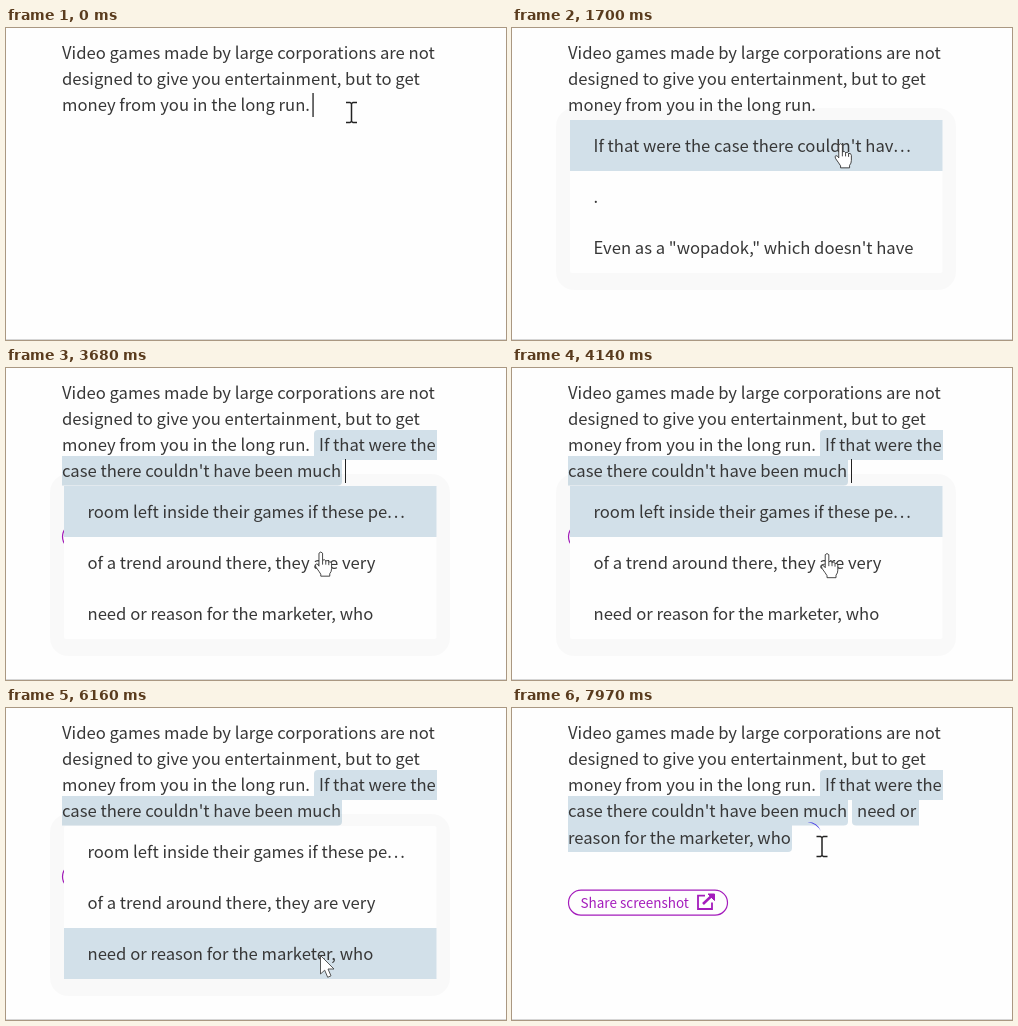
An HTML page that plays this animation: 500x312 px, repeating every 8 s.

```html
<!DOCTYPE html>
<html lang="en">
<head>
<meta charset="utf-8">
<title>Writing suggestions</title>
<style>
html, body { margin: 0; width: 100%; height: 100%; overflow: hidden; background: #fefefe; }
svg { display: block; width: 500px; height: 312px; }
text { font: 16.65px "Noto Sans CJK JP", "Noto Sans CJK SC", "Noto Sans", sans-serif; fill: #373737; white-space: pre; }
.dots { letter-spacing: 1.8px; }
.mark { fill: #d2e0e9; }
.share text { font-size: 13.5px; fill: #a41cbc; }
.share path, .share rect { fill: none; stroke: #a41cbc; }
.halo { fill: #000; fill-opacity: .018; }
.panel { fill: #fefefe; }
#spin { fill: #4a42e6; }
</style>
</head>
<body>
<svg viewBox="0 0 500 312">
  <rect y="311" width="500" height="1" fill="#d6d6d6"/>
  <g id="first">
    <path class="mark" d="M431 62H312a4 4 0 0 0-4 4V88H56V117.500H332a4 4 0 0 0 4-4V92H431Z"/>
    <text x="313" y="83">If that were the</text>
    <text x="56" y="109">case there couldn't have been much</text>
  </g>
  <g id="second">
    <path class="mark" d="M407 88H344a4 4 0 0 0-4 4V113.500a4 4 0 0 0 4 4H407Z"/>
    <path class="mark" d="M56 114H280V140a4 4 0 0 1-4 4H56Z"/>
    <text x="345" y="109">need or</text>
    <text x="56" y="136">reason for the marketer, who</text>
  </g>
  <text x="56" y="30.500">Video games made by large corporations are not</text>
  <text x="56" y="57">designed to give you entertainment, but to get</text>
  <text x="56" y="83">money from you in the long run.</text>
  <g id="share" class="share">
    <rect x="56.500" y="156.200" width="159" height="25" rx="12.500" stroke-width="1.200"/>
    <text x="68.500" y="174">Share screenshot</text>
    <path d="M193 161.600H186V175H200V168.600" stroke-width="1.800"/>
    <path d="M191 170L199.500 162" stroke-width="2.600"/>
    <path d="M196 160H202.500V166.500Z" style="fill:#a41cbc" stroke-width="1"/>
  </g>
  <g id="menus"></g>
  <rect id="caret" fill="#222"/>
  <path id="spin"/>
  <g id="beam" fill="none">
    <path d="M-5-10H-1.500L0-9L1.500-10H5M0-9V9M-5 10H-1.500L0 9L1.500 10H5" stroke="#fff" stroke-width="3"/>
    <path d="M-5.500-10H-1.500L0-9L1.500-10H5.500M0-9V9M-5.500 10H-1.500L0 9L1.500 10H5.500" stroke="#222" stroke-width="1.500"/>
  </g>
  <path id="arrow" d="M.5.5V19L4.700 15.200L7.700 22.300L11 20.800L8 14H14Z" fill="#fff" stroke="#444" stroke-width=".9"/>
  <g id="hand" fill="#fff" stroke="#333" stroke-width=".9" stroke-linejoin="round">
    <path d="M-1.800 1.500Q0-.8 1.800 1.500V8.500Q4 7.300 5 9.200Q7 8.300 8 10.200Q10.300 9.300 10.800 12V17Q10.800 20 9 22V24.500H0V22.500Q-1.500 20-4.800 15.500Q-6.500 12.500-4.500 12.300Q-3 12.300-1.800 14.500Z"/>
    <path d="M1.800 8.500V13M5 9.200V13M8 10.200V13.500" fill="none"/>
  </g>
</svg>
<script>
const LOOP = 8000;
const $ = id => document.getElementById(id);
const show = (el, on) => { el.style.display = on ? "" : "none"; };

// Suggestion menus: top edge, opening and closing times, highlighted row by time
const dots = '<tspan class="dots">...</tspan>';
const menus = [
  { y: 92, from: 860, open: 1085, end: 1710, pick: [[0, 0]],
    rows: ["If that were the case there couldn't hav" + dots, ".", 'Even as a "wopadok," which doesn\'t have'] },
  { y: 118, from: 3290, open: 3520, end: 6240, pick: [[0, 0], [4220, 1], [5080, 2]],
    rows: ["room left inside their games if these pe" + dots, "of a trend around there, they are very", "need or reason for the marketer, who"] }
];
const ROW = 51;
for (const m of menus) {
  $("menus").insertAdjacentHTML("beforeend", `<g>
    <rect class="halo" x="44" y="${m.y - 12}" width="400" height="182" rx="18"/>
    <rect class="panel" x="58" y="${m.y}" width="372.5" height="${3 * ROW}" rx="2"/>
    <rect class="mark" x="58" width="372.5" height="${ROW}"/>
    ${m.rows.map((s, i) => `<text x="81.5" y="${m.y + i * ROW + 32}">${s}</text>`).join("")}</g>`);
  m.el = $("menus").lastElementChild;
  m.mark = m.el.querySelector(".mark");
}

// Caret: from, to, x, y, width
const carets = [
  [0, 180, 306.4, 65, 1.3], [720, 1260, 306.4, 65, 1.3], [1710, 2250, 334.5, 91, 1.2],
  [2520, 3060, 339, 91, 1], [3360, 3900, 339, 91, 1], [4140, 4680, 339, 91, 1],
  [5220, 5780, 339, 91, 1], [6240, 6800, 278.5, 117, 1.2]
];

// Spinner: from, to, centre, then the angle it has at a given time
const spins = [
  [80, 940, 322, 74.5, 0, 80],
  [2520, 3360, 354, 101, 150, 2820],
  [7330, 8000, 296.5, 127, -56, 7970]
];

// Pointer: time, x, y, shape
const moves = [
  [0, 345.5, 84.5, "beam"], [1470, 345.5, 84.5, "beam"], [1600, 335, 108, "hand"],
  [1710, 328, 116, "hand"], [1790, 324, 135, "arrow"], [2110, 311, 172, "arrow"],
  [2520, 311, 172, "arrow"], [2800, 314, 169, "arrow"], [2900, 314, 169, "arrow"],
  [3280, 314, 179, "arrow"], [3440, 314, 179, "hand"], [3750, 315, 185, "hand"],
  [4140, 315, 185, "hand"], [4300, 318, 213, "hand"], [4910, 318, 213, "hand"],
  [4990, 317.5, 231, "hand"], [5060, 317.5, 231, "hand"], [5220, 318, 247, "hand"],
  [6080, 314, 247, "arrow"], [6620, 321.5, 258, "beam"], [6800, 321.5, 258, "beam"],
  [7090, 310, 138.5, "beam"]
];

const lastBefore = (list, t) => list.reduce((a, b) => b[0] <= t ? b : a);
const active = (list, t) => list.find(([a, b]) => t >= a && t < b);

// A crescent that turns and swings in and out
function drawSpin(t) {
  const s = active(spins, t);
  show($("spin"), s);
  if (!s) return;
  const [, , x, y, a0, t0] = s;
  const a = a0 + (t - t0) * 0.385;
  const r = 11 + 2 * Math.cos((a + 56) * Math.PI / 180);
  const h = 8, d = Math.sqrt(r * r - h * h), R = r * 1.5;
  $("spin").setAttribute("d", `M${d} ${-h}A${r} ${r} 0 0 1 ${d} ${h}A${R} ${R} 0 0 0 ${d} ${-h}Z`);
  $("spin").setAttribute("transform", `translate(${x} ${y}) rotate(${a})`);
}

function drawPointer(t) {
  const p = lastBefore(moves, t);
  const q = moves[moves.indexOf(p) + 1];
  const k = q && q[3] === p[3] ? (t - p[0]) / (q[0] - p[0]) : 0;
  const x = k ? p[1] + (q[1] - p[1]) * k : p[1];
  const y = k ? p[2] + (q[2] - p[2]) * k : p[2];
  for (const id of ["beam", "arrow", "hand"]) show($(id), id === p[3]);
  $(p[3]).setAttribute("transform", `translate(${x} ${y})`);
}

function draw(t) {
  show($("first"), t >= 1710);
  show($("second"), t >= 6240);
  show($("share"), t >= 1710);
  $("share").setAttribute("transform", `translate(0 ${t >= 6240 ? 26 : 0})`);

  for (const m of menus) {
    show(m.el, t >= m.from && t < m.end);
    m.el.style.opacity = Math.min(1, Math.max(0, (t - m.from) / (m.open - m.from)));
    m.mark.setAttribute("y", m.y + lastBefore(m.pick, t)[1] * ROW);
  }

  const c = active(carets, t);
  show($("caret"), c);
  if (c) {
    const box = { x: c[2], y: c[3], width: c[4], height: 24 };
    for (const k in box) $("caret").setAttribute(k, box[k]);
  }
  drawSpin(t);
  drawPointer(t);
}

function tick() {
  draw(performance.now() % LOOP);
  requestAnimationFrame(tick);
}
tick();
</script>
</body>
</html>
```
